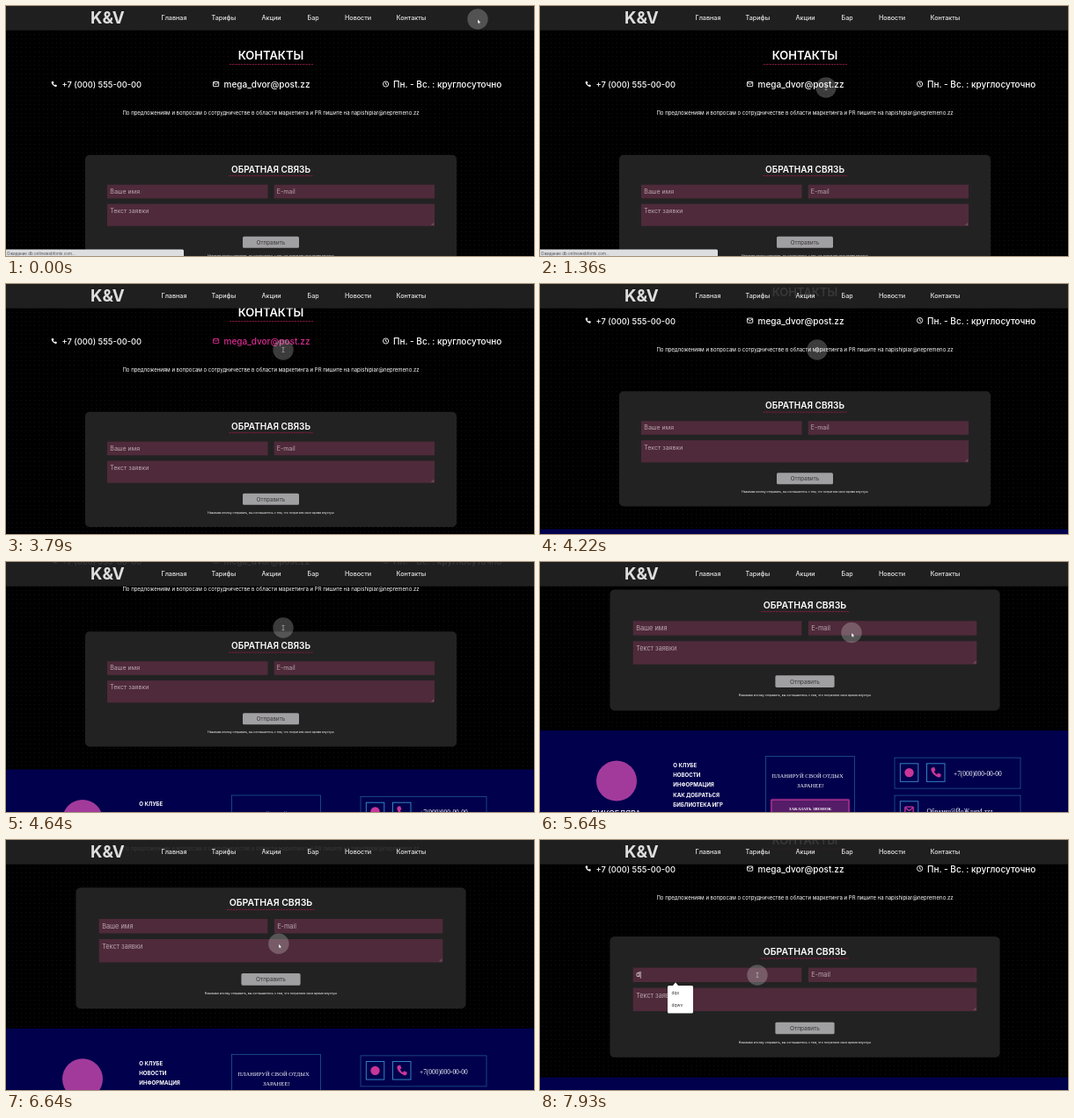
Animation of 600x285 px, one loop 8 s. Source, as an HTML page:

```html
<!DOCTYPE html>
<html lang="ru">
<head>
<meta charset="utf-8">
<title>Контакты</title>
<style>
html, body { margin: 0; width: 100%; height: 100%; overflow: hidden; background: #000; }
svg { display: block; width: 100%; height: 100%; font-family: Inter, Roboto, sans-serif; fill: #fff; }
.mid { text-anchor: middle; }
.serif { font-family: "Liberation Serif", "Noto Serif", serif; }
.nav { font-size: 7.2px; font-weight: 500; fill: #e6e6e6; }
.title { font-weight: 600; text-anchor: middle; }
.dash { stroke: #8a1c3c; stroke-width: .9; stroke-dasharray: 2.4 .8; }
.contact { font-size: 10px; font-weight: 500; }
.icon { fill: none; stroke: currentColor; stroke-width: .9; }
.field { fill: #4f2a3a; }
.hint { font-size: 7px; fill: #b9a5ae; }
.menu { font-size: 6.1px; font-weight: 700; }
.frame { fill: none; stroke: #1f5590; stroke-width: .8; }
.tile { fill: none; stroke: #3a8fd0; stroke-width: .9; }
.pink { color: #c93698; }
</style>
</head>
<body>
<svg viewBox="0 0 600 285" preserveAspectRatio="none">
  <defs>
    <pattern id="dots" width="5" height="5" patternUnits="userSpaceOnUse">
      <rect width="5" height="5" fill="#000"/>
      <rect x="2" y="2" width="1" height="1" fill="#161114"/>
    </pattern>
    <filter id="glow" x="-10%" y="-30%" width="120%" height="160%"><feGaussianBlur stdDeviation="1.5"/></filter>
    <path id="handset" d="M1.2.6 2.6.3 3.4 2.2 2.5 3Q3.1 4.3 4.2 4.8L5 3.9 6.8 4.7 6.5 6.2Q5.8 6.9 4.5 6.3 1.6 5 .7 2.3.4 1.2 1.2.6Z" fill="currentColor"/>
    <g id="envelope" class="icon"><rect x=".5" y="1" width="6.2" height="5.2" rx=".6"/><path d="M.6 1.6 3.6 3.9 6.6 1.6"/></g>
  </defs>

  <rect width="600" height="285" fill="url(#dots)"/>

  <g id="page">
    <text class="title" x="301" y="61" font-size="13">КОНТАКТЫ</text>
    <path class="dash" d="M254 66.5H349"/>

    <g color="#fff">
      <use href="#handset" x="51" y="85.5"/>
      <text class="contact" x="63.5" y="93.3" style="font-size:9.3px">+7 (000) 555-00-00</text>
    </g>
    <g id="email" fill="currentColor">
      <use href="#envelope" x="235" y="85.5"/>
      <text class="contact" x="247.5" y="93.3">mega_dvor@post.zz</text>
    </g>
    <g id="hours" fill="currentColor">
      <g class="icon"><circle cx="431.6" cy="89" r="3.1"/><path d="M431.6 87V89.2L433 90"/></g>
      <text class="contact" x="440" y="93.3">Пн. - Вс. : круглосуточно</text>
    </g>

    <text class="mid" x="301" y="124" font-size="6">По предложениям и вопросам о сотрудничестве в области маркетинга и PR пишите на napishipiar@nepremeno.zz</text>

    <g id="form">
      <rect x="90" y="169.7" width="422" height="131.3" rx="5" fill="#232223"/>
      <text class="title" x="301" y="189.7" font-size="10">ОБРАТНАЯ СВЯЗЬ</text>
      <path class="dash" d="M253.5 193.6H348.5"/>
      <rect class="field" x="115" y="203.7" width="182.5" height="15.6"/>
      <rect class="field" x="304.7" y="203.7" width="182.3" height="15.6"/>
      <rect class="field" x="115" y="225.6" width="372" height="25.2"/>
      <path d="M483.5 250 486.3 247.2M485.2 250 486.3 248.9" stroke="#a892a0" stroke-width=".5"/>
      <text class="hint" id="name" x="118.3" y="213.8"></text>
      <path id="caret" stroke="#fff" stroke-width=".6"/>
      <text class="hint" x="307.8" y="213.8">E-mail</text>
      <text class="hint" x="118.3" y="236">Текст заявки</text>
      <rect x="269" y="262.8" width="64" height="13" rx="1.6" fill="#a09fa1"/>
      <text class="mid" x="301" y="271.6" font-size="6.2" fill="#38363a">Отправить</text>
      <text class="mid" x="301" y="285.6" font-size="3.3">Нажимая кнопку отправить, вы соглашаетесь с тем, что потратили свое время впустую</text>
    </g>

    <rect y="327" width="600" height="160" fill="#00004c"/>
    <circle cx="87" cy="384.5" r="23" fill="#a23a9c"/>
    <text class="mid" x="86.5" y="425.3" font-size="9.2">ПИКСЕЛЯРА</text>
    <g id="menu"></g>

    <rect class="frame" x="256.5" y="356.5" width="101" height="90"/>
    <g class="serif mid">
      <text x="304" y="381" font-size="6.6">ПЛАНИРУЙ СВОЙ ОТДЫХ</text>
      <text x="307.3" y="392" font-size="6.6">ЗАРАНЕЕ!</text>
      <rect x="263" y="406" width="88" height="20" fill="#b02a90" filter="url(#glow)"/>
      <rect x="263" y="406" width="88" height="20" fill="#551c68" stroke="#d43c9c"/>
      <text x="307" y="418" font-size="5" font-weight="700">ЗАКАЗАТЬ ЗВОНОК</text>
    </g>

    <rect class="frame" x="403" y="358" width="143" height="35"/>
    <rect class="frame" x="403" y="401" width="143" height="35"/>
    <rect class="tile" x="409.3" y="364.7" width="20.5" height="20.5"/>
    <rect class="tile" x="439.5" y="364.7" width="20.5" height="20.5"/>
    <rect class="tile" x="409.3" y="407.7" width="20.5" height="20.5"/>
    <g class="pink">
      <circle cx="419.5" cy="375" r="5.2" fill="currentColor"/>
      <use href="#handset" transform="translate(443.2 368.2) scale(1.85)"/>
      <use href="#envelope" transform="translate(414.1 412.5) scale(1.5)"/>
    </g>
    <g class="serif" font-size="7.4">
      <text x="470" y="379">+7(000)000-00-00</text>
      <text x="439.5" y="421.6">Образец@ЙоЖдап4.zzz</text>
    </g>
  </g>

  <rect width="600" height="27.7" fill="#232323" opacity=".9"/>
  <text x="96" y="20" font-size="18.7" font-weight="700" style="fill:#dedede">K&amp;V</text>
  <g id="nav"></g>

  <g id="status">
    <path d="M0 277.5H200.5Q202 277.5 202 279V285H0Z" fill="#dcdee0"/>
    <text x="1" y="283.5" font-size="4.5" fill="#4a4c50">Ожидание db.onlinewebfonts.com...</text>
  </g>

  <g id="popup">
    <path d="M151 166 154 162.3 157 166H172.5Q174 166 174 167.5V196Q174 197.5 172.5 197.5H146.5Q145 197.5 145 196V167.5Q145 166 146.5 166Z"/>
    <g font-size="4.9" fill="#333"><text x="149.5" y="176.4">dqx</text><text x="149.5" y="190.4">dqwv</text></g>
  </g>

  <g id="cursor">
    <circle r="11.7" fill="#fff" fill-opacity=".23"/>
    <path id="arrow" d="M0 0V5.2L1.2 4.2 2 5.8 2.8 5.4 2.1 3.9H3.6Z" stroke="#222" stroke-width=".3"/>
    <path id="beam" d="M-1.3-2.6H1.3M0-2.6V2.6M-1.3 2.6H1.3" stroke="#c8c8c8" stroke-width=".6"/>
  </g>
</svg>
<script>
const $ = id => document.getElementById(id);
const LOOP = 8000, START = 500, STEP = 1000 / 7;

// Each key is [ms, value, ...]; values ease between neighbouring keys.
const scrollKeys = [[1640, 0], [2500, 18], [2930, 18], [3500, 24], [3930, 24], [4640, 90.5], [6070, 147], [6220, 147], [7220, 56.5]];
const cursorKeys = [[500, 536, 15], [1360, 325, 93], [1500, 318, 94], [1800, 330, 90], [2350, 480, 82], [2790, 305, 103],
  [3600, 315, 75], [4930, 315, 75], [6070, 372, 83], [7220, 247, 154]];
const emailKeys = [[1360, 0], [1640, 1], [1930, 1], [2210, 0], [3360, 0], [3640, 1], [3930, 1], [4210, 0]];
const hoursKeys = [[2070, 0], [2360, 1], [2500, 1], [2790, .14], [2930, 0]];
const formKeys = [[4640, 1], [4930, 1.05]];

function track(keys, t) {
  const next = keys.findIndex(key => key[0] > t);
  if (next === 0) return keys[0].slice(1);
  if (next < 0) return keys[keys.length - 1].slice(1);
  const [from, to] = [keys[next - 1], keys[next]];
  const p = (t - from[0]) / (to[0] - from[0]), eased = p * p * (3 - 2 * p);
  return from.slice(1).map((v, i) => v + (to[i + 1] - v) * eased);
}

const show = (id, on) => $(id).setAttribute("visibility", on ? "visible" : "hidden");
const move = (id, value) => $(id).setAttribute("transform", value);
const tint = a => `rgb(${255 - 35 * a},${255 - 210 * a},${255 - 110 * a})`;
const label = (cls, x, y, text) => `<text class="${cls}" x="${x}" y="${y}">${text}</text>`;

$("nav").innerHTML = [[176.5, "Главная"], [233.5, "Тарифы"], [290.5, "Акции"], [342.5, "Бар"], [385, "Новости"], [443.5, "Контакты"]]
  .map(([x, text]) => label("nav", x, 16.2, text)).join("");
$("menu").innerHTML = ["О КЛУБЕ", "НОВОСТИ", "ИНФОРМАЦИЯ", "КАК ДОБРАТЬСЯ", "БИБЛИОТЕКА ИГР"]
  .map((text, i) => label("menu", 151.3, 369 + 11.15 * i, text)).join("");

function draw(time) {
  const t = time < START ? 0 : START + Math.floor((time - START + 6) / STEP) * STEP;
  const [x, y] = track(cursorKeys, t);
  const [scale] = track(formKeys, t);
  const typed = t > 7600, focused = t > 7300;
  const beam = t > 1300 && t < 1650 || t > 2700 && t < 5000 || t > 7050;

  move("page", `translate(0 ${-track(scrollKeys, t)[0]})`);
  move("form", `translate(301 235.4) scale(${scale}) translate(-301 -235.4)`);
  move("cursor", `translate(${x} ${y})`);
  $("email").style.color = tint(track(emailKeys, t)[0]);
  $("hours").style.color = tint(track(hoursKeys, t)[0]);

  $("name").textContent = typed ? "d" : "Ваше имя";
  $("name").style.fill = typed ? "#fff" : "";
  $("caret").setAttribute("d", `M${typed ? 123.2 : 118.2} 207.8V215.2`);
  show("caret", focused);
  show("popup", typed);
  show("status", t < 1700);
  show("arrow", !beam);
  show("beam", beam);
}

function tick() {
  draw(performance.now() % LOOP);
  requestAnimationFrame(tick);
}
tick();
</script>
</body>
</html>
```
